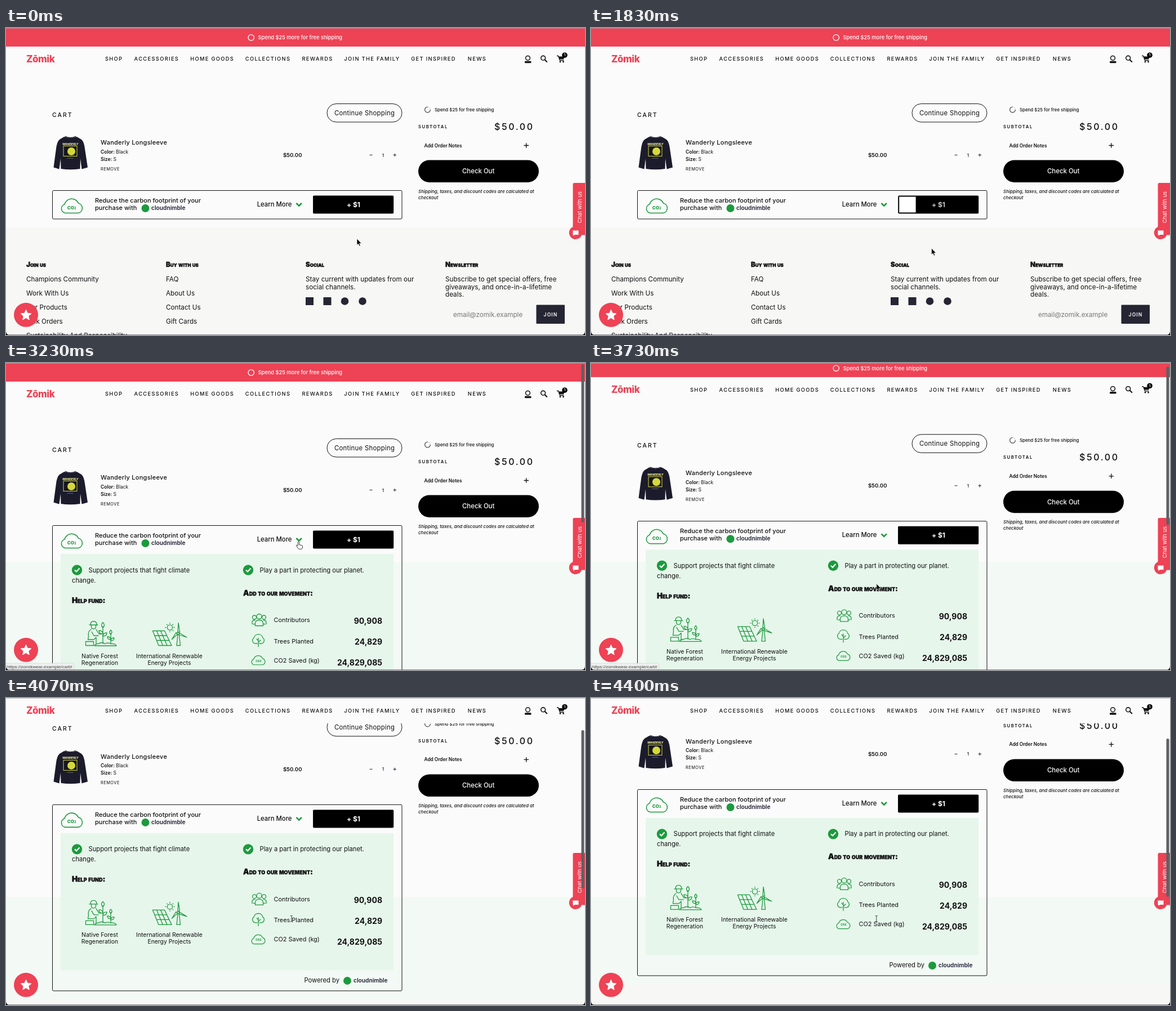
Write an HTML page that moves like this. It is 1028 px wide and 545 px high and loops after 4430 ms.

```html
<!DOCTYPE html>
<html lang="en">
<head>
<meta charset="utf-8">
<title>Cart</title>
<style>
  html, body { margin: 0; width: 100%; height: 100%; overflow: hidden; background: #fbfbfb; }
  svg { display: block; width: 100%; height: 100%; font: 400 11.7px Inter, "Liberation Sans", sans-serif; fill: #111; cursor: default; user-select: none; }
  .m { font-weight: 500; }
  .b { font-weight: 600; }
  .c { text-anchor: middle; }
  .e { text-anchor: end; }
  .red { fill: #ee4255; }
  .white { fill: #fff; }
  .green { fill: #1c9a3d; }
  .brand { font-size: 10.2px; font-weight: 600; fill: #1d1d33; }
  .nav { font-size: 9.3px; font-weight: 500; letter-spacing: 1.35px; text-anchor: middle; }
  .head { font-size: 11.6px; font-weight: 900; font-variant: small-caps; stroke: #111; stroke-width: .35px; }
  .big { font-size: 13.4px; }
  .line { fill: none; stroke: #111; }
  .icon { fill: none; stroke: #1c9a3d; stroke-width: 1.3; stroke-linejoin: round; stroke-linecap: round; }
  .lead { font-size: 11px; font-weight: 500; }
  .body { font-size: 11.2px; }
  .small { font-size: 10.4px; text-anchor: middle; }
  .row { font-size: 10.9px; }
  .num { font-size: 14px; font-weight: 700; text-anchor: end; }
  .spec { font-size: 8.5px; }
</style>
</head>
<body>
<svg viewBox="0 0 1028 545">
  <defs>
    <path id="cloud" d="M105 328.5a8 8 0 0 1-1-15.5a13 13 0 0 1 24.5-2a9 9 0 0 1 0 17.5z"/>
    <g id="tick">
      <circle r="9.2" class="green"/>
      <path d="M-4 0l3 3 5.5-6" fill="none" stroke="#fff" stroke-width="2.2"/>
    </g>
    <clipPath id="fold"><rect id="foldBox" x="82" y="339" width="622" height="0"/></clipPath>
  </defs>
  <rect width="1028" height="545" fill="#fbfbfb"/>
  <rect id="tint" y="353" width="1028" height="192" fill="#f3f9f5"/>

  <g id="page">
    <!-- cart item -->
    <text x="82" y="157.5" class="m" font-size="10.5" letter-spacing="2">CART</text>
    <rect x="570" y="134.5" width="133" height="32.5" rx="16.2" class="line"/>
    <text x="636.6" y="155" class="c" font-size="11.3" letter-spacing=".3">Continue Shopping</text>
    <path d="M103.5 193Q114.5 197 125.500 193L134 198Q138.500 202 140 214L145 247.500L134.500 250.500L132 232L131.500 250Q114.500 252.500 97.500 250L97 232L94.500 250.500L84.500 247.500L89 214Q90.500 202 95 198Z" fill="#1b1b2b"/>
    <path d="M105 192.500Q114.500 197 124 192.500" fill="none" stroke="#35354a" stroke-width="1.500"/>
    <text x="114.200" y="207.500" class="c" font-size="5" font-weight="800" font-style="italic" style="fill:#eeec9a">WANDERLY</text>
    <rect x="102" y="209.500" width="24" height="18" fill="#161620" stroke="#d5d83b"/>
    <circle cx="116" cy="219" r="7" fill="#d5d83b"/>
    <path d="M108.500 231.200h11" stroke="#8f8f8f" stroke-width=".7"/>
    <text x="168" y="207" class="m" font-size="11" letter-spacing=".25">Wanderly Longsleeve</text>
    <text x="168" y="222.500" class="spec"><tspan class="b">Color:</tspan> Black</text>
    <text x="168" y="235.500" class="spec"><tspan class="b">Size:</tspan> S</text>
    <text x="168" y="252.500" font-size="7.400" letter-spacing=".5">REMOVE</text>
    <text x="508.700" y="229" class="b c" font-size="9.600">$50.00</text>
    <text x="669.500" y="228.500" class="m c" font-size="8">1</text>
    <path d="M645.500 225.500h5M687.500 225.500h5.500M690.200 222.800v5.500" class="line" style="stroke:#23233a"/>

    <!-- order summary -->
    <circle cx="748.500" cy="145" r="4.900" class="line" style="stroke:#ccc"/>
    <path d="M748.500 140.100a4.900 4.900 0 1 0 4.900 4.900" class="line" style="stroke:#555;stroke-width:1.300"/>
    <text x="761" y="148" class="m" font-size="7.900">Spend $25 for free shipping</text>
    <text x="732" y="178" class="b" font-size="7.700" letter-spacing="1.600">SUBTOTAL</text>
    <text x="867" y="181" class="m" font-size="16" letter-spacing="2.600">$50.00</text>
    <text x="742.500" y="211.500" class="b" font-size="8.300">Add Order Notes</text>
    <path d="M919.500 208.500h8.500M923.700 204.300v8.500" class="line" stroke-width="1.300"/>
    <rect x="732" y="234.500" width="214" height="39.500" rx="19.700" fill="#000"/>
    <text x="838.700" y="258.300" class="m c white" font-size="11.400">Check Out</text>
    <g class="m" font-size="8" font-style="italic">
      <text x="732" y="293">Shipping, taxes, and discount codes are calculated at</text>
      <text x="732" y="303.700">checkout</text>
    </g>

    <!-- carbon offset box -->
    <rect id="box" x="82.500" y="288.500" width="620.500" height="50.500" rx="2" class="line"/>
    <use href="#cloud" class="icon" style="stroke-width:1.600"/>
    <text x="116.700" y="321.500" class="c green" font-size="8" font-weight="800">CO<tspan font-size="5.500">2</tspan></text>
    <text x="158" y="310" class="lead">Reduce the carbon footprint of your</text>
    <text x="158" y="323" class="lead">purchase with</text>
    <circle cx="247.500" cy="320" r="7" class="green"/>
    <text x="258" y="323" class="brand">cloudnimble</text>
    <text x="445.700" y="317" class="m" font-size="11.300">Learn More</text>
    <path d="M515.500 311l4.700 4.700 4.700-4.700" fill="none" stroke="#1c9a3d" stroke-width="2.600"/>
    <rect x="546.200" y="298.500" width="141" height="30" rx="1" fill="#fff" stroke="#000" stroke-width="2"/>
    <rect id="sweep" y="298" height="31" fill="#000"/>
    <text id="price" x="617" y="318" class="c" font-size="12" font-weight="700">+ $1</text>

    <!-- unfolded details -->
    <g clip-path="url(#fold)">
      <rect x="97" y="339" width="591" height="243.500" fill="#e6f6eb"/>
      <use href="#tick" x="126" y="367.500"/>
      <text x="146.500" y="371.500" class="body">Support projects that fight climate</text>
      <text x="117" y="389.500" class="body">change.</text>
      <use href="#tick" x="430" y="367.500"/>
      <text x="450.500" y="371.500" class="body">Play a part in protecting our planet.</text>
      <text x="117" y="425.500" class="head big">Help fund:</text>
      <text x="421" y="412.500" class="head big">Add to our movement:</text>
      <g class="icon">
        <path d="M148 465h15M150 465q0-6.500 5.500-6.500t5.500 6.500M151.500 465v3q0 4 4 4t4-4v-3M151 473q-6 3-4.500 12l-1 6M160 473l5 8h4M152 477l4 7h8M146 491h10l4-4v13M141.500 494.500h14v7h-14zM157 502q2-4 7-3.500 6-4 12 0 5-3 10 0 8-1 10 3.500z"/>
        <path d="M172 498v-30M172 470q-5-5 0-9.500 5 4.500 0 9.500M172 481q-7 0-7-6 7 0 7 6M172 485q7 0 7-6-7 0-7 6M186 498v-18M186 482q-4-4 0-8 4 4 0 8M186 491q-6 0-6-5 6 0 6 5M186 493q6 0 6-5-6 0-6 5"/>
        <path d="M260.500 475.500h21l12.500 26h-23zM267.500 475.500l11 26M274.500 475.500l11.500 26M264 484h21.500M267.500 492.500h22"/>
        <circle cx="291" cy="469.500" r="4.600"/>
        <path d="M291 461.500v1M291 476.500v1M283 469.500h1M298 469.500h1M285.500 464l.7.700M296.500 464l-.7.700M296 474.500l.7.700"/>
        <circle cx="306" cy="480" r="2"/>
        <path d="M305 478l1-16.500 2.500 15.500zM307.500 479l13.500 8-14-4.500zM304.500 481.500l-10 9 7.500-12zM305 483l-2 18.500h6.500l-2-18.500"/>
        <circle cx="449.500" cy="450" r="4.500"/><circle cx="441" cy="451.500" r="3.500"/><circle cx="458" cy="451.500" r="3.500"/>
        <path d="M442.500 466.500v-4q0-6 7-6t7 6v4zM437 463.500v-3q0-4 5-4M462 463.500v-3q0-4-5-4M439 463.500h3M457 463.500h3"/>
        <path d="M448 503.500v-15M448 496l4-4M448 493l-3-3M446 498h-3a5.500 5.500 0 0 1-3-10 8.200 8.200 0 0 1 16 0 5.500 5.500 0 0 1-3 10h-3"/>
        <use href="#cloud" transform="translate(373.200 325.500) scale(.64)" stroke-width="1.900"/>
      </g>
      <text x="448.300" y="530.500" class="c green" font-size="4.800" font-weight="800">CO2</text>
      <text x="166.500" y="523.500" class="small">Native Forest</text>
      <text x="166.500" y="535.500" class="small">Regeneration</text>
      <text x="290" y="523.500" class="small">International Renewable</text>
      <text x="290" y="535.500" class="small">Energy Projects</text>
      <text x="475.500" y="460" class="row">Contributors</text>
      <text x="475.500" y="497.500" class="row">Trees Planted</text>
      <text x="475.500" y="531.500" class="row">CO2 Saved (kg)</text>
      <text x="668" y="463" class="num">90,908</text>
      <text x="668" y="500" class="num">24,829</text>
      <text x="668" y="537" class="num">24,829,085</text>
      <text x="592" y="604" class="body e">Powered by</text>
      <circle cx="606" cy="601" r="7" class="green"/>
      <text x="617" y="604" class="brand">cloudnimble</text>
    </g>

    <!-- footer -->
    <g id="footer">
      <rect y="353.500" width="1028" height="400" fill="#f7f7f6"/>
      <g class="head">
        <text x="36" y="424">Join us</text>
        <text x="284" y="424">Buy with us</text>
        <text x="532" y="424">Social</text>
        <text x="780" y="424">Newsletter</text>
      </g>
      <text x="36" y="450">Champions Community</text>
      <text x="36" y="475">Work With Us</text>
      <text x="36" y="500">Our Products</text>
      <text x="36" y="525">Bulk Orders</text>
      <text x="36" y="550">Sustainability And Responsibility</text>
      <text x="284" y="450">FAQ</text>
      <text x="284" y="475">About Us</text>
      <text x="284" y="500">Contact Us</text>
      <text x="284" y="525">Gift Cards</text>
      <text x="532" y="450">Stay current with updates from our</text>
      <text x="532" y="463.700">social channels.</text>
      <g fill="#252533">
        <rect x="532" y="478" width="14" height="14"/>
        <rect x="563.500" y="478" width="14" height="14"/>
        <circle cx="601.500" cy="485" r="6.800"/>
        <circle cx="633" cy="485" r="6.800"/>
      </g>
      <text x="780" y="450">Subscribe to get special offers, free</text>
      <text x="780" y="463.700">giveaways, and once-in-a-lifetime</text>
      <text x="780" y="477.200">deals.</text>
      <text x="794" y="512.500" fill="#777">email@zomik.example</text>
      <rect x="941.500" y="491.500" width="50.500" height="33.500" rx="1" fill="#252533"/>
      <text x="967" y="511.500" class="b c white" font-size="8.600" letter-spacing="1.100">JOIN</text>
    </g>
  </g>

  <!-- header -->
  <g id="banner">
    <rect width="1028" height="33" class="red"/>
    <circle cx="435.200" cy="17" r="5.200" fill="none" stroke="#fff" stroke-width="1.300"/>
    <text x="447.500" y="20.200" class="m white" font-size="9.300">Spend $25 more for free shipping</text>
  </g>
  <g id="header">
    <rect y="33" width="1028" height="44.500" fill="#fbfbfb"/>
    <text x="36" y="60.500" class="red" font-size="17" font-weight="800" letter-spacing="-.5">Zōmik</text>
    <g class="nav">
      <text x="191.700" y="58.300">SHOP</text>
      <text x="267.400" y="58.300">ACCESSORIES</text>
      <text x="366.200" y="58.300">HOME GOODS</text>
      <text x="465" y="58.300">COLLECTIONS</text>
      <text x="553" y="58.300">REWARDS</text>
      <text x="650" y="58.300">JOIN THE FAMILY</text>
      <text x="759" y="58.300">GET INSPIRED</text>
      <text x="836.500" y="58.300">NEWS</text>
    </g>
    <circle cx="926.500" cy="53.300" r="3.900" class="line" stroke-width="1.500"/>
    <rect x="921" y="58.800" width="11.500" height="3.400" rx="1.200"/>
    <circle cx="953.700" cy="53.300" r="3.900" class="line" stroke-width="1.600"/>
    <path d="M956.500 56.200l4.300 4.300" class="line" stroke-width="2"/>
    <path d="M978 49.500h2.500l3 8h7" class="line" stroke-width="1.300"/>
    <path d="M981 50.500h11l-2 5h-7z"/>
    <circle cx="984" cy="60" r="1.400"/><circle cx="989.500" cy="60" r="1.400"/>
    <circle cx="992" cy="48.200" r="4.800" fill="#000"/>
    <text x="992" y="50.400" class="b c white" font-size="6">1</text>
  </g>

  <!-- floating buttons -->
  <path d="M1009 275h19v92.500h-21.500v-90q0-2.500 2.500-2.500z" class="red"/>
  <text transform="translate(1021.500 318) rotate(-90)" class="c white" font-size="9.600">Chat with us</text>
  <circle cx="1011.300" cy="363.500" r="11.500" class="red"/>
  <path d="M1006.500 359.500h10v7.500h-6.500l-2.500 2v-2h-1z" class="white"/>
  <circle cx="35.500" cy="509.300" r="21.500" class="red"/>
  <path id="star" class="white" stroke="#fff" stroke-linejoin="round"/>

  <g id="status">
    <path d="M0 533h118q3 0 3 3v9h-121z" fill="#eef0ef" stroke="#ccd0ce" stroke-width=".6"/>
    <text x="2" y="541.700" fill="#444" style="font:8.100px 'Liberation Sans',sans-serif">https://zomikwear.example/cart#</text>
  </g>
  <rect id="thumb" x="1021.500" width="5" height="281" rx="2.500" fill="#5e6064"/>
  <path d="M0 .4h1028" stroke="#a9adb5" stroke-width=".8"/>
  <path d="M0 538q0 7 7 7h-7zM1028 538q0 7-7 7h7z" fill="#000"/>
  <path d="M5 544.700h1018" stroke="#4a4a55" stroke-width=".8"/>

  <g id="pointer">
    <path id="arrow" d="M0 0V11.500l2.600-2.400 1.800 4.100 1.900-.8-1.800-4h3.600z" fill="#000" stroke="#fff" stroke-width=".7"/>
    <path id="hand" d="M-1.200 1q0-1.300 1.200-1.300t1.200 1.300v4.200l5 1.200q1.200.4 1 1.800l-.8 3.600q-.3 1-1.300 1h-4.300q-.8 0-1.300-.8l-3.700-5q-.2-1.500 1.200-1.200l1.800 1.300z" fill="#fff" stroke="#222" stroke-width=".9"/>
    <path id="beam" d="M-2.200-5.500q2.200 0 2.200 1.300v8.400q0 1.300-2.200 1.300M2.200-5.500q-2.200 0-2.200 1.300M2.200 5.500q-2.200 0-2.200-1.300" fill="none" stroke="#333" stroke-width=".9"/>
  </g>
</svg>
<script>
  const LOOP = 4430;
  const $ = id => document.getElementById(id);
  const set = (id, attrs) => { for (const k in attrs) $(id).setAttribute(k, attrs[k]); };
  const show = (id, on) => set(id, { opacity: +on });
  const move = (id, x, y) => set(id, { transform: `translate(${x} ${y})` });
  const ramp = (t, from, to) => Math.min(1, Math.max(0, (t - from) / (to - from)));
  const smooth = p => p * p * (3 - 2 * p);
  const linear = p => p;

  // keys: [time, ...values]
  function track(t, keys, ease) {
    const n = keys.findIndex(k => k[0] > t);
    if (n < 0) return keys[keys.length - 1].slice(1);
    const a = keys[Math.max(0, n - 1)], b = keys[n];
    const p = ease(ramp(t, a[0], b[0]));
    return a.slice(1).map((v, i) => v + (b[i + 1] - v) * p);
  }

  const pointerKeys = [
    [0, 623, 374], [220, 623, 374], [640, 612, 316], [1500, 612, 316],
    [1780, 604.5, 391], [2200, 604.5, 391], [2750, 519.5, 317.5],
    [3320, 519.5, 317.5], [3620, 506.8, 391.8]
  ];
  const scrollKeys = [
    [0, 0], [3690, 0], [3770, 15], [3830, 37], [3950, 71],
    [4070, 99], [4230, 117], [4400, 126], [4430, 127]
  ];

  $('star').setAttribute('d', 'M' + Array.from({ length: 10 }, (_, i) => {
    const r = i % 2 ? 4.6 : 9.8, a = (i / 5 - .5) * Math.PI;
    return `${35.5 + r * Math.cos(a)} ${510 + r * Math.sin(a)}`;
  }).join('L') + 'Z');

  function draw() {
    const t = performance.now() % LOOP;

    const hover = smooth(ramp(t, 520, 880)) - smooth(ramp(t, 1580, 1940));
    const left = 545.3 + 142.7 * hover;
    set('sweep', { x: left, width: 688 - left });
    const shade = Math.round(255 * (1 - hover));
    set('price', { fill: `rgb(${shade},${shade},${shade})` });

    const open = smooth(ramp(t, 2950, 3180));
    const extra = 280 * open;
    set('box', { height: 50.5 + extra });
    set('foldBox', { height: extra });
    move('footer', 0, extra);
    set('tint', { opacity: open });

    const [scroll] = track(t, scrollKeys, linear);
    move('page', 0, -scroll);
    move('banner', 0, -scroll);
    move('header', 0, scroll < 45 ? -scroll : -32.5);
    show('thumb', t > 2950);
    set('thumb', { y: 2 + scroll * .556 });
    set('status', { opacity: t < 2780 ? 0 : 1 - ramp(t, 3740, 3880) });

    move('pointer', ...track(t, pointerKeys, smooth));
    const hand = (t > 515 && t < 1575) || (t > 2690 && t < 3420);
    const beam = t > 3980;
    show('hand', hand);
    show('beam', beam);
    show('arrow', !hand && !beam);

    requestAnimationFrame(draw);
  }
  draw();
</script>
</body>
</html>
```
